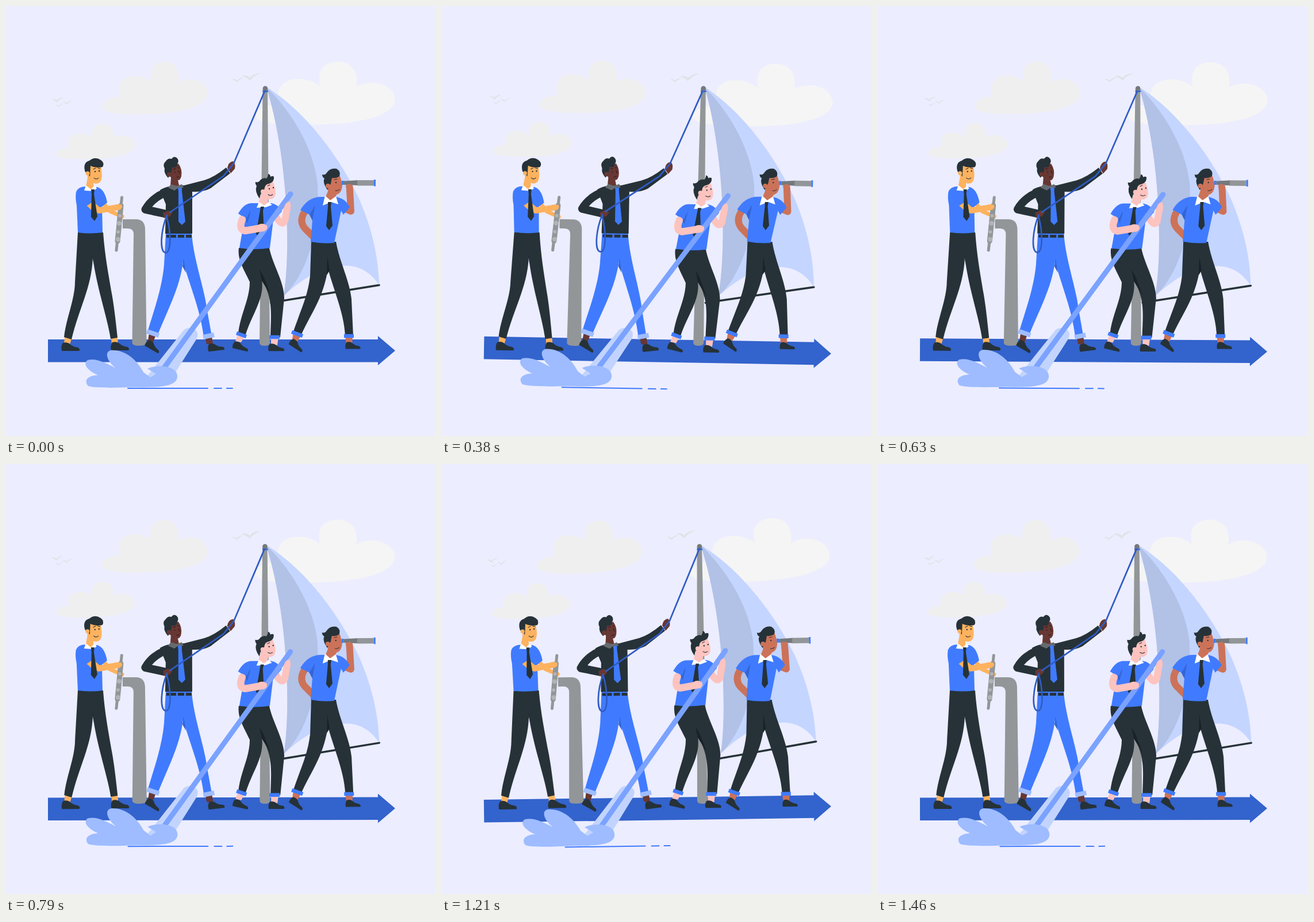
Write an HTML page that moves like this. It is 748 px wide and 748 px high and loops after 1500 ms.

```html
<!DOCTYPE html>
<html lang="en">
<head>
<meta charset="utf-8">
<title>Crew on an arrow</title>
<style>
  html, body { margin: 0; height: 100%; overflow: hidden; background: #ecedff; }
  svg { display: block; width: 100vw; height: 100vh; }
  .blue { fill: #407bff; }
  .dark { fill: #263238; }
  .grey { fill: #929698; }
  .white { fill: #fff; }
  .line { fill: none; stroke-linecap: round; stroke-linejoin: round; }
  .ink { stroke: #263238; }
  .cuff { fill: none; stroke: #407bff; stroke-width: 6.5; }
  .shade { fill: #3363cc; }
  .fold { fill: #192228; }
  .tan { --skin: #fdb25f; }
  .deep { --skin: #673733; }
  .pink { --skin: #fdc3bf; }
  .brown { --skin: #cc7259; }
  .skin { fill: var(--skin); }
  .limb { stroke: var(--skin); }
</style>
</head>
<body>
<svg viewBox="0 0 748 748">
  <defs>
    <path id="cloud" d="M167 176C167 165 182 158 198 159C192 138 202 122 222 122C235 121 245 127 252 132C248 108 258 97 276 97C294 97 303 112 300 133C318 122 347 127 351 150C352 172 315 184 270 187C225 190 168 190 167 176Z"/>
    <path id="gull" d="M0 1Q10-2 14 4Q22-5 33-4Q22-1 14 9Q10 3 0 1Z"/>
    <path id="shoe" class="dark" d="M3 1Q9-1 14 2Q20 8 29 9Q34 12 31 15H1Q-1 7 3 1Z"/>
  </defs>

  <!-- sky -->
  <g data-pivot="378 330">
    <g fill="#efefef">
      <use href="#cloud"/>
      <use href="#cloud" transform="translate(-37.4 140) scale(.745 .67)"/>
      <use href="#cloud" transform="translate(213.6 -19.4) scale(1.32 1.2)" fill="#f5f5f5"/>
    </g>
    <g fill="#e2e2e6">
      <use href="#gull" transform="translate(410 121)"/>
      <use href="#gull" transform="translate(393 127) scale(.64)"/>
      <use href="#gull" transform="translate(79 162) scale(.64)"/>
      <use href="#gull" transform="translate(98 167) scale(.55)"/>
      <use href="#gull" transform="translate(86 172) scale(.4)"/>
    </g>
  </g>

  <!-- arrow -->
  <path data-pivot="375 599.5" class="shade" d="M73 580H647V574L677 599.5L647 625V619.5H73Z"/>

  <!-- mast and sail -->
  <g data-pivot="450 365">
    <path class="line ink" stroke-width="3.5" d="M461 516L649 485.5"/>
    <path class="grey" d="M446.5 148V144C446.5 138 455 138 455 144L459 586Q459 591 450 591Q441 591 441 586Z"/>
    <path fill="#c4d5ff" d="M453 141C520 182 580 262 614 335C638 390 648 440 649 485C632 460 610 450 585 452C545 455 515 475 483 504C496 425 490 260 453 141Z"/>
    <path fill="#b2c1e6" d="M453 141C491 178 534 240 542 310C546 400 520 470 483 504C496 425 490 260 453 141Z"/>
    <path fill="#75797c" d="M447 147V143C447 138 455 138 455 143V147Z"/>
    <path class="line" stroke="#3363cc" stroke-width="2.5" d="M447.5 148.5H455"/>
  </g>

  <!-- lookout -->
  <g data-pivot="566 440" class="brown">
    <path class="skin" d="M500 566L514 572L507 584L498 580ZM590 574H603L602 588H592Z"/>
    <use href="#shoe" transform="translate(498 577) rotate(33) scale(.86)"/>
    <use href="#shoe" transform="translate(590 584) scale(.83)"/>
    <path class="dark" d="M531 410H574C580 445 598 478 601 510L604 574H590C588 535 572 500 560 457C552 508 533 530 513 573L500 566C512 530 525 505 529 470Z"/>
    <path class="fold" d="M559 436L563 460L558 468Z"/>
    <path class="cuff" d="M497 567L516 574M588 574H605"/>
    <path class="line limb" stroke-width="12" d="M520 357Q509 374 520 387L536 403M588 352L600 357L598 320"/>
    <path class="skin" d="M528 397L540 398Q546 405 542 411L533 410Z"/>
    <path class="blue" d="M550 332Q526 331 512 355L528 363L533 373L530 410Q550 414 571 412L583 356L587 363L598 350Q590 334 573 332Z"/>
    <path fill="#3465d4" d="M528 363L538 346L533 373Z"/>
    <path class="skin" d="M558 298L578 290Q583 298 585 312Q584 326 575 328L571 337L563 342L555 335L560 322Z"/>
    <path class="white" d="M555 330L564 338L574 331L578 345L566 341L551 347Z"/>
    <path class="dark" d="M560 341L566 341L565 349L568 382L562 390L557 383L560 349Z"/>
    <path class="dark" d="M559 320L555 313Q551 304 554 300Q550 298 550 293Q555 295 558 290Q564 281 575 283Q583 288 580 296Q575 300 567 299L565 309Z"/>
    <circle class="skin" cx="560" cy="313" r="4"/>
    <circle class="dark" cx="574" cy="307" r="1.2"/>
    <path class="line ink" stroke-width="1" d="M571 302L576 301M573 321Q578 322 580 319"/>
    <path class="blue" d="M584 304H588V311H584Z"/>
    <path fill="#75797c" d="M588 304.5L612 303V312L588 311Z"/>
    <path class="grey" d="M611 303H640V312.500H611Z"/>
    <path class="blue" d="M640 302H643V313.500H640Z"/>
    <path class="skin" d="M591 312Q597 307 603 312Q605 320 602 326H593Z"/>
  </g>

  <!-- steering column -->
  <path data-pivot="217 461" class="grey" d="M203 371H226Q241 371 242 387L244.500 586Q245 591 232 591Q219.500 591 219.500 586L222 397Q222 387 212 387H203Z"/>

  <!-- steersman -->
  <g data-pivot="165 432" class="tan">
    <path class="skin" d="M102 576L114 579L111 589H101ZM183 577H194L195 589H184Z"/>
    <use href="#shoe" transform="translate(96 585)"/>
    <use href="#shoe" transform="translate(182 584)"/>
    <path class="dark" d="M125 394H169C172 435 178 465 183 495C188 520 191 550 194 577L182 579C177 545 158 490 151 438C149 490 127 525 114 580L101 576C104 545 120 510 120 480Z"/>
    <path class="fold" d="M150 428L153 450L151 440Z"/>
    <path class="line limb" stroke-width="7" d="M171 345L181 357L202 366"/>
  </g>
  <g data-pivot="217 461">
    <path class="line" stroke="#929698" stroke-width="5" d="M201.500 333L192 425"/>
    <path class="line" stroke="#929698" stroke-width="9" d="M200 347L194 409"/>
    <g fill="#b0b4b6">
      <circle cx="198" cy="365" r="3"/><circle cx="197" cy="378" r="4"/>
      <circle cx="195" cy="393" r="3"/><circle cx="195" cy="406" r="4"/>
    </g>
  </g>
  <g data-pivot="165 432" class="tan">
    <path class="blue" d="M139 314Q126 314 122 323Q120 333 123 347L125 394Q147 397 168 394L167 349L176 342Q172 319 159 315Z"/>
    <path class="skin" d="M140 347L151 340L163 350L188 346Q199 343 202 347Q203 353 196 355L162 361Q153 360 140 347Z"/>
    <path class="blue" d="M124 322Q131 316 138 324L152 340L140 348L125 340Z"/>
    <path class="skin" d="M140 277L164 275Q169 296 165 304Q161 311 152 308L153 315L148 321L139 314L142 298Z"/>
    <path class="white" d="M139 312L148 319L154 312L158 317L152 322L136 321Z"/>
    <path class="dark" d="M148 319H154L153 327L159 366L154 374L148 367L149 327Z"/>
    <path class="dark" d="M137 286Q134 272 145 269Q155 261 165 268Q172 273 168 280Q157 283 147 278L146 297L142 290Q138 291 137 286Z"/>
    <circle class="skin" cx="142" cy="291" r="3.5"/>
    <circle class="dark" cx="155" cy="288" r="1.2"/><circle class="dark" cx="162" cy="287" r="1.2"/>
    <path class="line ink" stroke-width="1" d="M152 284L156 282M160 282L164 283M153 299Q157 303 161 299"/>
  </g>

  <!-- rope man -->
  <g data-pivot="318 432" class="deep">
    <path class="skin" d="M249 569L260 574L256 585L247 582ZM346 575H358L360 588H349Z"/>
    <use href="#shoe" transform="translate(247 579) rotate(30) scale(.88)"/>
    <use href="#shoe" transform="translate(350 588) rotate(-7) scale(.9)"/>
    <path class="blue" d="M278 395H323C326 440 345 490 349 525L358 574L344 576C338 530 323 495 308 445C302 490 285 520 263 574L246 568C255 535 271 495 275 450Z"/>
    <path class="shade" d="M309 440L313 464L307 453Z"/>
    <path class="cuff" style="stroke: #a0bdff; stroke-width: 8" d="M245 566L266 573M343 576L362 572"/>
    <path class="line ink" stroke-width="14" d="M276 325Q253 335 242.500 354L275 361"/>
    <path class="dark" d="M288 313Q276 315 268 320L278 345L277 396H324V323Q343 324 356 317L390 291L383 281Q362 298 345 303L310 312Z"/>
    <path class="dark" d="M279 398H296V403H279ZM299 398H310V403H299ZM313 398H323V403H313Z"/>
    <path class="skin" d="M385 282Q387 271 395 270Q400 274 398 283L391 291ZM273 360L282 356L290 359L285 366L275 369Z"/>
    <path class="skin" d="M281 286L300 274Q307 284 305 296Q303 304 299 303L301 312L294 316L286 312L287 299Z"/>
    <path fill="#666b6f" d="M282 316L287 310L297 313L306 310L309 316L300 316L293 321Z"/>
    <path class="blue" d="M299 316H306L306 323L312 375L306 381L300 375L300 323Z"/>
    <path class="dark" d="M282 299Q274 290 276 283Q272 275 278 270Q282 264 288 266Q292 260 297 264Q302 269 298 275Q299 279 294 281L289 281L287 292Z"/>
    <circle class="skin" cx="284" cy="293" r="4"/>
    <path class="line" stroke="#2c1717" stroke-width="1" d="M291 284L295 283M299 281L301 282M293 289H295M300 286L302 291M297 298L301 297"/>
  </g>
  <path data-pivot="372 310" class="line" stroke="#2f5cc4" stroke-width="2.7" d="M450 148L396 274L378 296L285 359M280 364C269 391 267 427 277 429C288 431 287 394 280 368"/>

  <!-- rower, oar and water -->
  <g data-pivot="319 478" class="pink">
    <path class="skin" d="M404 569L415 574L409 585L399 583ZM461 575H474L472 590H461Z"/>
    <use href="#shoe" transform="translate(396 582) rotate(13) scale(.88)"/>
    <use href="#shoe" transform="translate(456 587) scale(.88)"/>
    <path class="dark" d="M405 421H458C464 450 484 480 484 508L477 576H460C461 535 465 510 445 476C450 510 428 535 416 574L404 569C408 535 424 510 424 480C415 460 402 442 405 421Z"/>
    <path class="fold" d="M441 458L448 470L460 502L445 478Z"/>
    <path class="cuff" d="M401 569L418 575M458 576H476"/>
    <path class="line limb" stroke-width="12" d="M470 367Q480 384 485 374L489 352"/>
    <path class="blue" d="M427 343Q414 343 404 361L417 370L410 398L406 421Q432 425 459 421L465 372L469 370L480 357Q473 345 462 343Z"/>
    <path fill="#3465d4" d="M416 370L426 356L420 378Z"/>
    <path class="skin" d="M446 308L462 302Q469 313 469 326Q468 337 456 336L455 346L447 350L439 343L443 330Z"/>
    <path class="white" d="M440 341L449 347L457 341L463 346L452 350L436 351Z"/>
    <path class="dark" d="M443 349H449L447 356L449 394L441 405L435 396L442 356Z"/>
    <path class="dark" d="M441 335Q432 322 436 313Q433 309 434 306Q439 308 443 302Q449 298 453 300Q456 297 456 292Q460 293 460 297Q464 295 466 297Q467 306 458 309Q451 310 450 316L448 325L443 327Z"/>
    <circle class="skin" cx="447" cy="323" r="4"/>
    <circle class="dark" cx="458" cy="318" r="1.2"/><circle class="dark" cx="465" cy="316" r="1.2"/>
    <path class="line ink" stroke-width="1" d="M455 313L459 311M456 328Q460 331 464 328"/>
    <path fill="#c2d4fd" d="M309 564Q315 558 326 561Q338 567 331 580L288 648L244 646Z"/>
    <path class="line" stroke="#7aa2ff" stroke-width="9" d="M495 327L385 478L276 628"/>
    <path class="line limb" stroke-width="12.500" d="M411 371Q404 389 416 391L445 386"/>
    <path class="skin" d="M438 381Q447 376 454 382Q456 389 449 392L438 392ZM484 350Q486 341 493 340Q497 346 494 355L487 362Z"/>
    <path class="blue" d="M414 350L404 361L419 369L426 353Z"/>
    <path fill="#9ebcff" d="M143 661C135 652 141 643 160 642C141 634 133 622 142 616C158 612 175 622 191 630C175 617 171 602 182 599C207 597 228 616 239 637L251 646L261 640L246 631C262 623 299 625 298 645C297 661 272 664 225 663C195 664 155 665 143 661Z"/>
    <path class="line" stroke="#407bff" stroke-width="2" d="M212 665H351M362 665H375M384 665H394"/>
  </g>
</svg>
<script>
  const LOOP = 1500;
  const parts = [...document.querySelectorAll('[data-pivot]')];

  // Linear sway in degrees: 0, 1 at a quarter, -1 at three quarters, 0.
  const sway = p => p < .25 ? 4 * p : p < .75 ? 2 - 4 * p : 4 * p - 4;

  function draw() {
    const angle = sway(performance.now() % LOOP / LOOP);
    for (const part of parts)
      part.setAttribute('transform', `rotate(${angle} ${part.dataset.pivot})`);
    requestAnimationFrame(draw);
  }
  draw();
</script>
</body>
</html>
```
